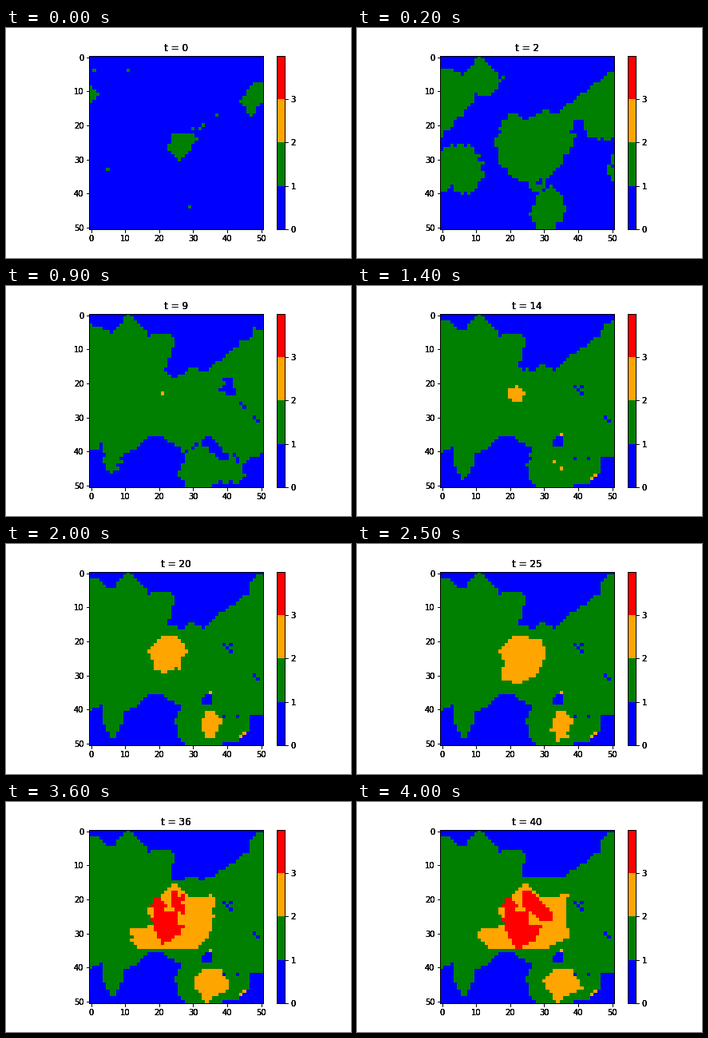
Recreate the animation shown at these times as a matplotlib script. Size 432 by 288 pixels, loop 4.1 s.

```python
import numpy as np
import matplotlib.pyplot as plt
from matplotlib.animation import FuncAnimation
from matplotlib.colors import ListedColormap
from matplotlib.path import Path

N = 51
FRAMES = 41
W, H = 432, 288
OVERDRAW = 4  # repeated drawing gives lines and text their heavy edges
rng = np.random.default_rng(4)
rows, cols = np.mgrid[0:N, 0:N]
centres = np.column_stack([cols.ravel(), rows.ravel()])


def area(*corners):
    return Path(corners).contains_points(centres).reshape(N, N)


def disc(col, row, radius):
    return np.hypot(cols - col, rows - row) <= radius


def spots(*cells):
    mask = np.zeros((N, N), bool)
    for c, r in cells:
        mask[r, c] = True
    return mask


def arrival(keys):
    """Frame at which each cell is reached, spreading from one mask to the next."""
    reach = np.where(keys[0][1], keys[0][0], np.inf)
    for (t0, _), (t1, mask) in zip(keys, keys[1:]):
        new = mask & np.isinf(reach)
        old = np.argwhere(np.isfinite(reach))
        gap = np.abs(np.argwhere(new)[:, None] - old)
        gap = np.minimum(gap, N - gap)  # the map wraps around
        dist = np.sqrt((gap ** 2).sum(2)).min(1) + rng.uniform(0, 1.2, new.sum())
        reach[new] = t0 + np.ceil(dist / dist.max() * (t1 - t0))
    return reach


def grow_land():
    seeds = (area((24, 22.6), (29.5, 22.6), (31.4, 24), (26.4, 30.4), (22.6, 27))
             | area((48, 7.5), (51, 7.5), (51, 12.4), (47, 17.4), (43.6, 13),
                    (46.5, 9))
             | disc(0, 11, 2.2)
             | spots((1, 4), (11, 4), (37, 17), (33, 20), (32, 21), (30, 21),
                     (5, 33), (29, 44)))

    # Stretches of coast that hardly move.
    cape = [(11, -0.4), (17, 6), (22.5, 5.5), (24.6, 7.5), (23.4, 12)]
    inlet = [(13.5, 39.5), (17.5, 35.3), (21, 35.6), (25, 38.5)]

    north = area((-1, -1), (-1, 3.5), (3, 3.5), (6.2, 5.5), *cape, (21.5, 16.4),
                 (24, 18.5), (30, 15.6), (33.5, 16.6), (51, 3.4), (51, -1))
    south = area((-1, 51), (-1, 40.5), (3.6, 37.5), (5.5, 46.5), (6.5, 46.5),
                 (9.6, 40.5), *inlet, (28.5, 39.7), (34.5, 35), (40.5, 40.4),
                 (46, 42.4), (51, 40.4), (51, 51))
    island = area((32, 37.6), (38, 42.6), (42, 41.8), (45.6, 47), (43.5, 49),
                  (38, 48.8), (34, 51), (28.5, 51), (26, 46), (28, 40.5))
    lake = area((39, 18.5), (41.4, 18.5), (42.4, 24), (37.5, 22.5))
    river = (cols >= 43) & (rows == cols - 18)
    early_sea = north | (south & ~island) | lake | river

    north = area((-1, -1), (-1, 2), (1.5, 1.5), (6.2, 5), *cape, (22.6, 15.4),
                 (27.5, 16.4), (29.4, 14.5), (33.5, 16.5), (37, 12.5),
                 (46.4, 6), (47, 2.6), (48.5, 0.5), (51, 0.5), (51, -1))
    southwest = area((-1, 51), (-1, 41), (4, 38.5), (3.6, 43), (5.5, 48),
                     (7.5, 48), (10, 43), (10, 40.5), *inlet, (27, 39.5),
                     (24.6, 42.5), (25.6, 48), (28.5, 51))
    southeast = area((51, 51), (51, 41.5), (46, 41.8), (46.5, 46), (43, 49),
                     (33, 51))
    pond = area((33, 35.5), (35.5, 36), (35.5, 38.5), (33, 38.5))
    cove = area((49.5, 28), (49.5, 32.5), (47, 32), (46.5, 30.5))
    cross = (abs(cols - 40) == abs(rows - 22)) & (abs(cols - 40) <= 2)
    creek = (rows == 42) & (cols % 2 == 1) & (cols > 38) & (cols < 46)
    late_sea = north | southwest | southeast | pond | cove | cross | creek

    silted = late_sea & ~(north & (rows > 13))
    return arrival([(0, seeds), (4, ~early_sea), (18, ~late_sea), (40, ~silted)])


def grow_orange():
    dots = spots((35, 35), (45, 47), (44, 48), (33, 43), (35, 45))
    small_town = area((34, 40.6), (36.4, 40.6), (38.5, 43.5), (36, 48.4),
                      (34, 48.4), (32.5, 45))
    large_town = area((33, 41), (38, 40.6), (41.4, 46), (36, 48.6),
                      (33.5, 50.4), (29.6, 44))
    small_city = area((21, 18.5), (29.5, 19.5), (30.5, 24), (28, 29.5),
                      (23, 32.4), (17, 31.4), (18.5, 26), (17, 23))
    large_city = area((24.5, 14.5), (29, 20), (37.4, 18.5), (36, 23),
                      (37.4, 31), (30.5, 34.5), (14, 34.4), (9.6, 29.5),
                      (18.4, 27.5), (17, 24), (21, 18.5))
    town = arrival([(12, dots), (20, small_town), (40, large_town)])
    city = arrival([(9, spots((21, 23))), (14, disc(21.8, 23.2, 2.3)),
                    (25, small_city), (40, large_city)])
    return np.minimum(town, city)


def grow_red():
    pair = disc(20, 22, 2) | disc(20, 26, 2)
    band = area((24, 17.8), (26.5, 17.6), (32.4, 24), (32, 26.5),
                (29.5, 26.4), (23, 21.5))
    core = area((19, 19.6), (21.4, 20.5), (20.5, 23.4), (25, 23.5),
                (25.4, 27.5), (29.4, 28), (27.5, 32), (22.4, 34.4),
                (20.5, 33), (18, 26.5))
    return arrival([(27, spots((20, 22), (20, 26))), (31, pair),
                    (40, band | core)])


land, orange, red = grow_land(), grow_orange(), grow_red()


def state(t):
    return np.select([red <= t, orange <= t, land <= t], [3, 2, 1], 0)


plt.rcParams["font.family"] = "DejaVu Sans"
fig = plt.figure(figsize=(W / 72, H / 72), dpi=72, facecolor="white")
cmap = ListedColormap(["blue", "green", "orange", "red"])


def panels(left, width, xlim, ylim, xticks, yticks, side="left"):
    """Stacked axes in one place; only the lowest carries colour."""
    stack = []
    for _ in range(OVERDRAW):
        ax = fig.add_axes([left / W, 0.125, width / W, 0.755], facecolor="none")
        ax.set(xlim=xlim, ylim=ylim, xticks=xticks, yticks=yticks)
        ax.tick_params(axis="y", left=side == "left", right=side == "right",
                       labelleft=side == "left", labelright=side == "right")
        stack.append(ax)
    return stack


tens = range(0, N, 10)
maps = panels(104.4, 217.44, (-0.5, 50.5), (50.5, -0.5), tens, tens)
image = maps[0].imshow(state(0), cmap=cmap, vmin=0, vmax=3, aspect="auto",
                       interpolation="nearest")
titles = [ax.set_title("t = 0", fontsize=12) for ax in maps]

bars = panels(338.58, 10.87, (0, 1), (0, 4), [], range(4), "right")
bars[0].pcolormesh([0, 1], range(5), np.arange(4)[:, None], cmap=cmap)


def draw(t):
    image.set_data(state(t))
    for title in titles:
        title.set_text(f"t = {t}")
    return image, *titles


anim = FuncAnimation(fig, draw, frames=FRAMES, interval=100, repeat=True,
                     repeat_delay=0, blit=False)
plt.show()
```
